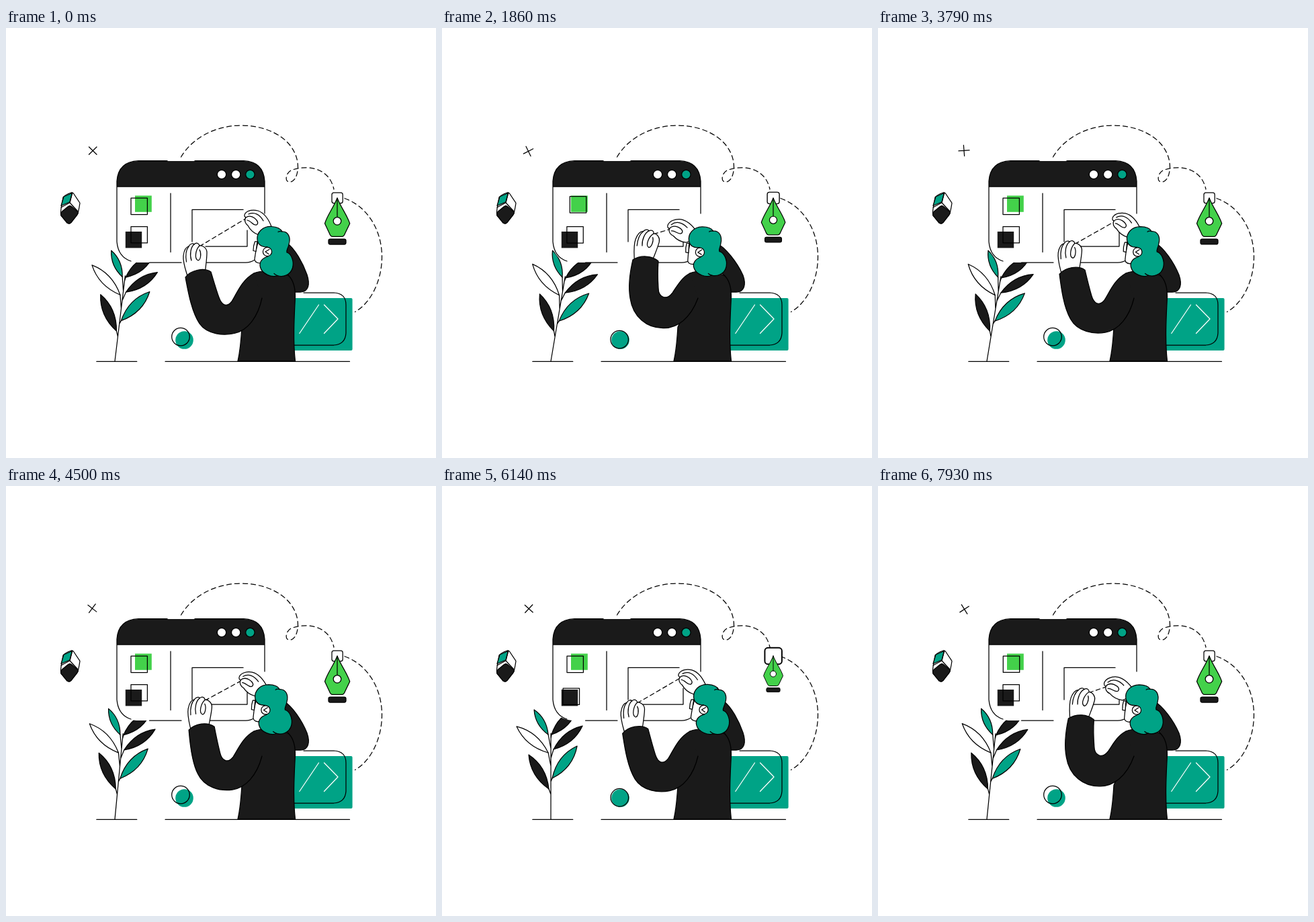
These frames come from a looping animation (640 by 640 pixels, 8 s). An HTML page:

```html
<!DOCTYPE html>
<html lang="en">
<head>
<meta charset="utf-8">
<title>Designer at work</title>
<style>
  html, body { margin: 0; width: 100%; height: 100%; overflow: hidden; background: #fff; }
  svg { display: block; width: 100vw; height: 100vh; }
  .line { fill: none; }
  .white { fill: #fff; }
  .dark { fill: #1a1a1a; }
  .teal { fill: #00a386; }
  .green { fill: #43d14a; }
  .bare { stroke: none; }
  .dash { fill: none; stroke-dasharray: 7 5; }
</style>
</head>
<body>
<svg viewBox="0 0 640 640" stroke="#000" stroke-width="1.25" stroke-linecap="round" stroke-linejoin="round">
  <!-- trails, cross and cube -->
  <path class="dash" d="M260.5 192C277 164 311 145 351 145C400 146 434 172 434.500 207C434 222 428 230 421 229C415 228 416 217 424 212C447 203 481 207 488 240"/>
  <path class="dash" d="M504 253.500C541 267 560 305 559.500 342C559 378 542 410 519.500 422.500"/>
  <path id="cross" class="line" d="M123.500 177L135 188.300M135 177L123.500 188.300"/>
  <path class="white" d="M96 245.500Q99 244 101 247L110 260.500Q109 268 107 276L96 290Q94 292 91 290L82 279Q81 277 82 269L85 252Q90 247 96 245.500Z"/>
  <path class="teal" d="M86 251L98.500 245.500L95 259L82 264.500Z"/>
  <path class="line" d="M98.500 246L95 260L107 273M82 267L95 260"/>
  <path class="dark" d="M83.500 273L92 266Q95 263 98 266L106 273Q108 275 106 278L97 289.500Q94 292 91 290L82 279Q81 276 83.500 273Z"/>

  <!-- plant -->
  <g id="plant">
    <path class="line" d="M162 496V368M162 459L159 451M162 417L158 397M162 391L158 370M162 440L164 435M162 405L166 392M162 376L163 370"/>
  </g>

  <!-- browser window -->
  <path class="white bare" d="M165 236H385V320Q384 348 357 349H194Q165 347 165 318Z"/>
  <path class="dark bare" d="M165 236V228Q167 199 197 198H354Q383 199 385 228V236Z"/>
  <path class="line" d="M240 197.700H197Q167 199 165 228V318Q167 341 186 347M213.500 349H261M297 349H357Q364 349 369.500 345.500M385 276V228Q383 199 354 197.700H281M165 236H385M245 246V333.500"/>
  <circle class="white" cx="321" cy="218" r="6.700"/>
  <circle class="white" cx="342.200" cy="218" r="6.700"/>
  <circle class="teal" cx="363.400" cy="218" r="6.700"/>
  <rect class="green bare" x="192" y="249.500" width="24.800" height="24.300"/>
  <rect id="frameA" class="line" x="186" y="253.200" width="24.400" height="24.400"/>
  <rect class="dark bare" x="177.800" y="303" width="24.400" height="24.400"/>
  <rect id="frameB" class="line" x="186" y="295.500" width="24.400" height="24.400"/>
  <path class="line" d="M353 270.400H277V318M297 325H359V301"/>

  <!-- disc, ground and code card -->
  <circle class="teal bare" cx="265.500" cy="464.500" r="13.300"/>
  <circle id="ring" class="line" cx="260" cy="459.600" r="13.300"/>
  <rect class="teal bare" x="420" y="402" width="95.600" height="78" rx="2"/>
  <path class="line" d="M443 394H488Q506 395 506 412V454Q505 471 488 472H425"/>
  <path class="line" stroke="#fff" d="M465.500 412L436.800 454.500M473.500 412L494 433L473.500 454.500"/>

  <!-- person -->
  <path id="measure" class="line" stroke-dasharray="6.500 4.500"/>
  <g id="rightHand">
    <path class="white" d="M396 298C391 284 384 275 375 272C368 270 360 271 356 276C354 279 355 281 357 282C354 286 356 291 360 294C363 300 368 305 376 308L392 306Z"/>
    <path class="line" d="M357 282C361 279 366 280 370 283C375 287 376 291 373 293C368 295 365 287 359 286M361 277C370 273 378 278 383 287"/>
  </g>
  <path id="rightArm" class="dark"/>
  <path class="dark" d="M345 496C349 478 350 462 351 445C360 430 360 385 369 365C378 361 395 361 408 363L421 369C428 376 430.500 388 430.500 400C429 430 427 465 430.500 496Z"/>
  <path class="line" d="M134.800 496.300H194.800M237 496.300H511.500"/>
  <g id="leftHand">
    <path class="white" d="M271 372C267 359 263 349 264 339C265 331 267 326 272 325C274 321 278 320 280 322C283 319 287 320 288 324C293 323 299 328 299 334C299 345 297 355 296 368Z"/>
    <path class="line" d="M268.500 348C267 339 268 330 272 325M276 346C273 337 275 326 280 322M288 324C282 330 280 344 286 346C290 345 291 335 288 330"/>
  </g>
  <path id="sleeveFill" class="dark bare"/>
  <path id="sleeveLine" class="line"/>
  <g id="head">
    <path class="white" d="M376 315L372 331L370 344Q370 349 377 350L392 346V322Z"/>
    <path class="white" d="M374 318H370.500Q368 324 368 331.500L372 332.500Z"/>
    <path class="teal" d="M374 315C373 304 382 295 395 295.500C403 296 409 299 411 303C421 303 424 313 421 322C420 328 417 330 418 334C425 336 429 348 426.500 357C423 369 411 371 404 368.500C396 372 381 366 378.500 356C376 347 383 342 390 340L389 326C381 326 375 323 374 315Z"/>
    <path class="line" d="M404 368.500Q401 367.500 399 365.500M411 303Q407 302 405 303.500"/>
    <circle class="white" cx="389" cy="333" r="6.600"/>
    <path class="line" d="M392 329.500L386 333L391 336.500"/>
  </g>

  <!-- pen tool -->
  <rect id="anchor" class="white" x="485" y="245.200" width="16.200" height="15.600" rx="3"/>
  <g id="nib">
    <path class="green" d="M493 253C487 268 478 279 474.500 291L481.500 306Q483 310.300 486 310.300H500Q503 310.300 504.500 306L511.700 291C508 279 499 268 493 253Z"/>
    <path class="line" d="M493 253V281"/>
    <circle class="white" cx="493" cy="287.300" r="5.800"/>
    <rect class="dark" x="480" y="314" width="26" height="8" rx="2.500"/>
  </g>
</svg>

<script>
const LOOP = 8000;
const $ = id => document.getElementById(id);
const set = (id, name, value) => $(id).setAttribute(name, value);
const move = (id, value) => set(id, 'transform', value);

// Each leaf: base x, y, tip x, y, bulge, fill class
const leaves = [
  [159, 451, 129, 400, 14, 'dark'],
  [158, 397, 111, 358, 14, 'white'],
  [158, 370, 137, 333, 10, 'teal'],
  [164, 435, 201, 387, 15, 'teal'],
  [166, 392, 209, 357, 13, 'dark'],
  [163, 370, 200, 332, 14, 'dark']
];
for (const [x, y, tipX, tipY, bulge, fill] of leaves) {
  const dx = tipX - x, dy = tipY - y, len = Math.hypot(dx, dy);
  const nx = -dy / len * bulge, ny = dx / len * bulge;
  const mx = x + dx * 0.52, my = y + dy * 0.52;
  const leaf = document.createElementNS('http://www.w3.org/2000/svg', 'path');
  leaf.setAttribute('class', fill);
  leaf.setAttribute('d', `M${x} ${y}Q${mx + nx} ${my + ny} ${tipX} ${tipY}Q${mx - nx} ${my - ny} ${x} ${y}Z`);
  $('plant').append(leaf);
}

// Keys are [time, value] pairs joined by sine easing
const tracks = {
  sway: [[0, 6.9], [3100, 11], [5900, -0.1], [8640, 6.9]],
  left: [[0, 0], [1900, 1], [3300, 0.13], [4700, 0.31], [6200, 0.1], [8060, 0.97]],
  right: [[0, 0], [1900, 1], [3300, 0.27], [4700, 0.42], [6200, 0.15], [8060, 0.97]],
  head: [[0, 0], [1900, 1], [3070, 0.55], [4500, 0.5], [6200, -0.1], [8060, 0.8]]
};
function track(name, t) {
  const keys = tracks[name];
  const i = keys.findIndex(key => key[0] > t);
  const [t0, a] = keys[i - 1], [t1, b] = keys[i];
  return a + (b - a) * (1 - Math.cos(Math.PI * (t - t0) / (t1 - t0))) / 2;
}

const clamp = x => Math.min(1, Math.max(0, x));
const cubic = x => x < 0.5 ? 4 * x ** 3 : 1 - 4 * (1 - x) ** 3;

// Goes 0 to 1 to 0 between start, peak and end, repeating every period
function pulse(t, start, peak, end, period) {
  const u = t % period;
  return u < peak ? cubic(clamp((u - start) / (peak - start)))
                  : cubic(clamp((end - u) / (end - peak)));
}

// Blends two paths with the same commands
function blend(from, to, p) {
  const goal = to.match(/[\d.]+/g);
  let i = 0;
  return from.replace(/[\d.]+/g, n => (+n + (goal[i++] - n) * p).toFixed(2));
}

const sleeve = [
  'M381 402C375 430 360 450 340 454.5C325 458 300 457 288 440C276 422 271 392 267 371C275 360 295 356 305 363C309 376 313 390 317 401C321 412 328 417 336 407C344 394 351 375 369 365',
  'M381 402C370 432 350 447 330 446.5C305 447 284 430 280 402C277 385 280 362 284 345C295 338 312 338 322 347C321 360 321 372 322 387C322 401 334 406 343 394C350 384 357 371 369 365'
];
const backArm = [
  'M418 320C430 328 442 350 448 367C453 382 450 393 438 393L429 393L421 369L400 345Z',
  'M409 321C421 325 440 350 448 368C453 382 450 393 438 393L429 393L421 369L395 345Z'
];

// Pose of a hand: turned about a pivot, then shifted
function hand(id, p, pivotX, pivotY, shiftX, shiftY, turn, gripX, gripY) {
  move(id, `translate(${shiftX * p} ${shiftY * p}) rotate(${turn * p} ${pivotX} ${pivotY})`);
  const a = turn * p * Math.PI / 180, x = gripX - pivotX, y = gripY - pivotY;
  return [
    pivotX + shiftX * p + x * Math.cos(a) - y * Math.sin(a),
    pivotY + shiftY * p + x * Math.sin(a) + y * Math.cos(a)
  ];
}

const scaleAt = (x, y, s) => `translate(${x} ${y}) scale(${s}) translate(${-x} ${-y})`;

function render(t) {
  move('plant', `rotate(${track('sway', t)} 162 496)`);
  move('cross', `rotate(${t * 0.0583} 128.6 182.8)`);

  const green = pulse(t, 1650, 2000, 2900, 6200);
  const black = pulse(t, 1780, 2270, 3000, 4070);
  const disc = pulse(t, 1500, 1965, 2700, 4070);
  move('frameA', `translate(${5.8 * green} ${-3.4 * green})`);
  move('frameB', `translate(${-8 * black} ${7.6 * black})`);
  move('ring', `translate(${4.4 * disc} ${4.2 * disc})`);

  const press = pulse(t, 1650, 2250, 3800, 4070);
  move('anchor', scaleAt(493, 253, 1 + 0.64 * press));
  move('nib', scaleAt(493, 253, 1 - 0.25 * press));

  const left = track('left', t), right = track('right', t);
  const a = hand('leftHand', left, 286, 364, 17, -20, 15, 288, 325);
  const b = hand('rightHand', right, 375, 290, -17, 12, -14, 358, 283);
  set('measure', 'd', `M${a}L${b}`);
  const arm = blend(...sleeve, left);
  set('sleeveFill', 'd', arm);
  set('sleeveLine', 'd', arm);

  const head = track('head', t);
  move('head', `rotate(${-4.4 * head} 397 400)`);
  set('rightArm', 'd', blend(...backArm, head));
}

function tick(now) {
  render(now % LOOP);
  requestAnimationFrame(tick);
}
render(0);
requestAnimationFrame(tick);
</script>
</body>
</html>
```
